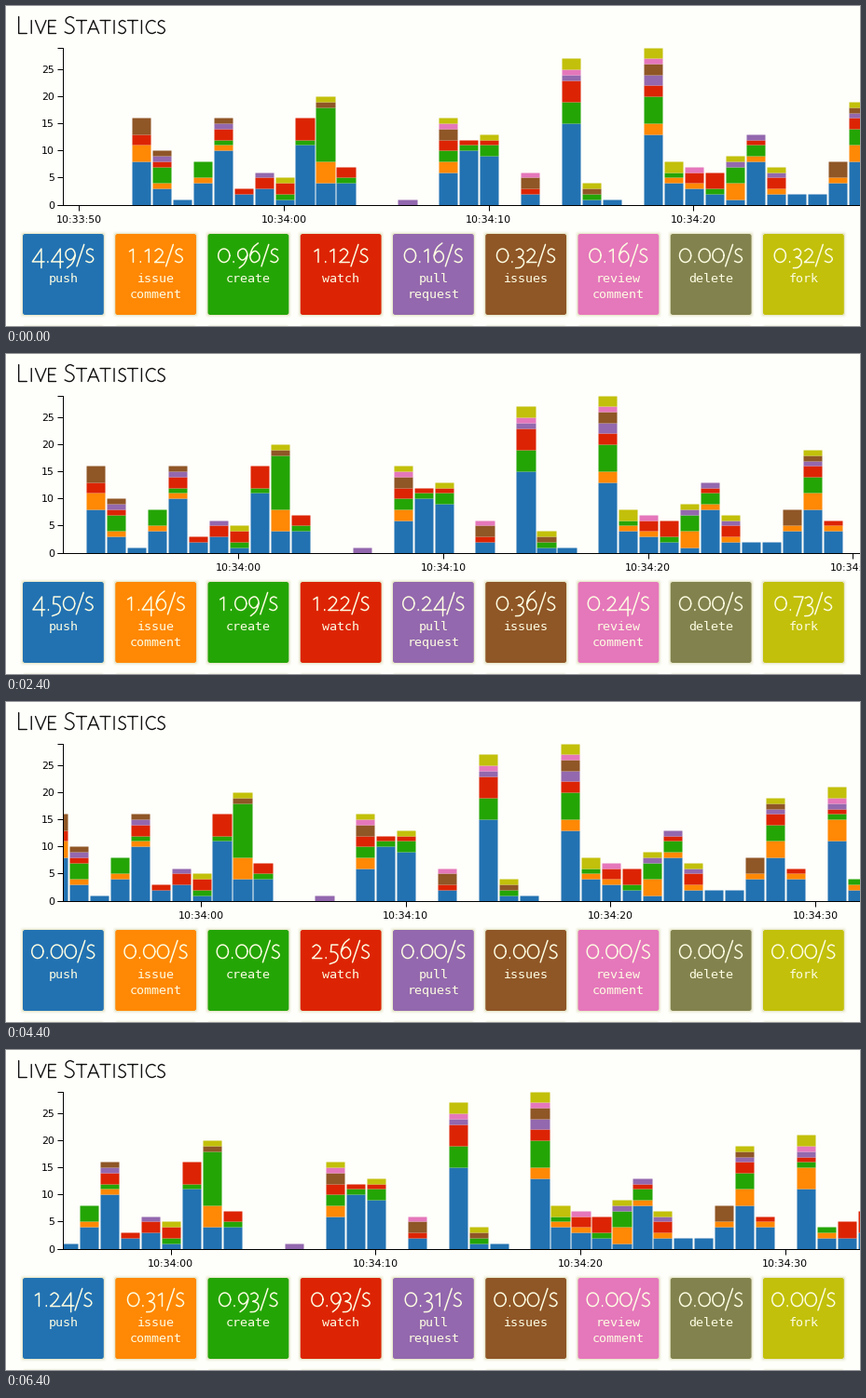
A matplotlib script that plays this animation: 916x344 px, repeating every 6.6 s.

```python
import numpy as np
import matplotlib.pyplot as plt
from matplotlib.animation import FuncAnimation
from matplotlib.collections import PatchCollection
from matplotlib.patches import FancyBboxPatch, PathPatch, Rectangle
from matplotlib.path import Path
from matplotlib.transforms import Affine2D

W, H, DPI = 916, 344, 100
STEP, FRAMES = 200, 33
PX = 72 / DPI
PAPER = "#fefefa"
CREAM = "#fdfde2"

NAMES = ["push", "issue\ncomment", "create", "watch", "pull\nrequest",
         "issues", "review\ncomment", "delete", "fork"]
COLORS = ["#2272b2", "#ff8804", "#24a506", "#dc2404", "#9368ae",
          "#8f5626", "#e577bb", "#82824e", "#c2c00a"]

# Events per second, keyed by seconds after 10:34:00
FIRST = -7
PUSH = [8, 3, 1, 4, 10, 2, 3, 1, 11, 4, 4, 0, 0, 0, 0, 6, 10, 9, 0, 2, 0,
        15, 1, 1, 0, 13, 4, 3, 2, 1, 8, 2, 2, 2, 4, 8, 4, 0, 11, 2, 2, 3]
COMMENT = {-7: 3, -6: 1, -4: 1, -3: 1, 2: 4, 8: 2, 18: 2, 19: 1, 20: 1, 22: 3,
           23: 1, 24: 1, 27: 1, 28: 3, 29: 1, 31: 4, 32: 1}
CREATE = {-6: 3, -4: 3, -3: 1, 0: 1, 1: 1, 2: 10, 3: 1, 8: 2, 9: 1, 10: 2,
          14: 4, 15: 1, 18: 5, 19: 1, 21: 1, 22: 3, 23: 2, 28: 3, 31: 1, 32: 1}
WATCH = {-7: 2, -6: 1, -3: 2, -2: 1, -1: 2, 0: 2, 1: 4, 3: 2, 8: 2, 9: 1,
         10: 1, 12: 1, 14: 4, 18: 2, 20: 2, 21: 3, 23: 1, 24: 2, 28: 2, 29: 1,
         31: 1, 33: 3, 34: 4}
PULL = {-6: 1, -3: 1, -1: 1, 6: 1, 14: 1, 18: 2, 22: 1, 23: 1, 24: 1, 28: 1, 31: 1}
ISSUES = {-7: 3, -6: 1, -3: 1, 2: 1, 8: 2, 12: 2, 15: 1, 18: 2, 27: 3, 28: 1}
REVIEW = {8: 1, 12: 1, 14: 1, 18: 1, 20: 1, 31: 1}
FORK = {0: 1, 2: 1, 8: 1, 10: 1, 14: 2, 15: 1, 18: 2, 19: 2, 22: 1, 24: 1,
        28: 1, 31: 2}
SERIES = [dict(enumerate(PUSH, FIRST)), COMMENT, CREATE, WATCH, PULL,
          ISSUES, REVIEW, {}, FORK]

# (start in ms, elapsed seconds, event counts)
RATES = [(0, 6.24, [28, 7, 6, 7, 1, 2, 1, 0, 2]),
         (400, 7.18, [34, 9, 9, 9, 2, 3, 2, 0, 3]),
         (1600, 8.22, [37, 12, 9, 10, 2, 3, 2, 0, 6]),
         (2600, 1, [0] * 9),
         (3000, 0.39, [0, 0, 0, 1, 0, 0, 0, 0, 0]),
         (6400, 3.23, [4, 1, 3, 3, 1, 0, 0, 0, 0])]

# Screen x of 10:34:00 over time
SCROLL_MS = [0, 1000, 1800, 2800, 4400, 5400, 6400]
SCROLL_X = [298, 280, 262.5, 240.5, 209, 196, 176.5]
SEC = 21.97
BASE, UNIT = 213.5, 5.82


def smooth(pts, n=8):
    """Catmull-Rom curve through the points."""
    p = np.array(pts, float)
    p = np.vstack([2 * p[0] - p[1], p, 2 * p[-1] - p[-2]])
    out = [p[1]]
    for a, b, c, d in zip(p, p[1:], p[2:], p[3:]):
        for t in np.arange(1, n + 1) / n:
            out.append(0.5 * (2 * b + (c - a) * t + (2 * a - 5 * b + 4 * c - d) * t**2
                              + (3 * b - a - 3 * c + d) * t**3))
    return np.array(out)


def line(*pts):
    return np.array(pts, float)


def curve(*pts):
    return smooth(pts)


def oval(cx, cy, rx, ry):
    a = np.linspace(0, 2 * np.pi, 41)
    return np.column_stack([cx + rx * np.cos(a), cy + ry * np.sin(a)])


SIX = curve((.7, 1.42), (.32, 1.08), (.1, .5), (.22, .1), (.47, 0), (.76, .2),
            (.78, .55), (.54, .82), (.3, .76), (.12, .5))
ESS = curve((.6, .92), (.38, 1), (.16, .86), (.18, .63), (.5, .45), (.63, .24),
            (.5, .04), (.3, 0), (.08, .09))

# Thin stroke lettering: advance and strokes, height 1
DIGITS = {
    "0": (1.02, [oval(.51, .5, .42, .5)]),
    "1": (.76, [line((.14, .8), (.42, .98), (.42, 0))]),
    "2": (.9, [curve((.12, .84), (.4, 1), (.68, .76), (.5, .4), (.1, 0)),
               line((.1, 0), (.8, 0))]),
    "3": (.8, [curve((.1, .9), (.38, 1), (.62, .78), (.52, .48), (.26, .36)),
               curve((.26, .36), (.6, .22), (.66, -.1), (.42, -.38), (.06, -.42))]),
    "4": (1, [line((.72, -.42), (.72, 1), (.06, .04), (.94, .04))]),
    "5": (.82, [line((.68, 1), (.2, 1), (.16, .48)),
                curve((.16, .48), (.46, .45), (.68, .18), (.55, -.22), (.08, -.42))]),
    "6": (.92, [SIX]),
    "7": (.8, [line((.06, 1), (.74, 1), (.26, -.42))]),
    "8": (.92, [oval(.46, .39, .36, .39), oval(.46, 1.1, .28, .32)]),
    "9": (.92, [[.92, 1] - SIX]),
    ".": (.4, [line((.2, 0), (.2, .06))]),
    "/": (.62, [line((.02, -.3), (.56, 1.32))]),
}
LETTERS = {
    "S": (.74, [ESS]),
    "L": (.68, [line((.12, 1), (.12, 0), (.6, 0))]),
    "I": (.5, [line((.25, 1), (.25, 0))]),
    "V": (.93, [line((.06, 1), (.46, 0), (.87, 1))]),
    "E": (.78, [line((.68, 1), (.14, 1), (.14, 0), (.7, 0)), line((.14, .52), (.6, .52))]),
    "T": (.86, [line((.04, 1), (.82, 1)), line((.43, 1), (.43, 0))]),
    "A": (.96, [line((.06, 0), (.48, 1), (.9, 0)), line((.2, .34), (.76, .34))]),
    "C": (.9, [curve((.8, .9), (.56, 1), (.26, .88), (.1, .5), (.26, .12),
                     (.56, 0), (.82, .1))]),
}
GLYPHS = {**DIGITS, **LETTERS}


def lettering(text, x, y, size, cap=None):
    """Path for text; letters after a word's first are set at the smaller size."""
    paths, start = [], True
    for ch in text:
        if ch == " ":
            x, start = x + size / 2, True
            continue
        s = cap if cap and start else size
        adv, strokes = GLYPHS[ch]
        paths += [Path(np.column_stack([x + s * p[:, 0], y - s * p[:, 1]])) for p in strokes]
        x, start = x + s * adv, False
    return Path.make_compound_path(*paths)


def rate_path(value, cx, size=14.5):
    text = f"{value:.2f}/S"
    width = size * sum(GLYPHS[c][0] for c in text)
    return lettering(text, cx - width / 2, 275.5, size)


def stroke(path, color, width):
    return ax.add_patch(PathPatch(path, fc="none", ec=color, lw=width * PX,
                                  capstyle="round", joinstyle="round"))


def label(x, y, text, **kw):
    opts = dict(family="DejaVu Sans", fontsize=11 * PX, color="black", ha="center",
                va="baseline", zorder=6)
    return ax.text(x, y, text, **{**opts, **kw})


def rule(xs, ys):
    return ax.plot(xs, ys, color="black", lw=PX, solid_capstyle="butt", zorder=5)[0]


def box(x, y, w, h, color, alpha=1.0):
    ax.add_patch(FancyBboxPatch((x, y), w, h, boxstyle="round,pad=0,rounding_size=2.5",
                                fc=color, ec="none", alpha=alpha))


fig = plt.figure(figsize=(W / DPI, H / DPI), dpi=DPI, facecolor=PAPER)
ax = fig.add_axes([0, 0, 1, 1])
ax.set_xlim(0, W)
ax.set_ylim(H, 0)
ax.set_autoscale_on(False)
ax.axis("off")

stroke(lettering("LIVE STATISTICS", 11.5, 29.5, 14, cap=18), "#111111", 1.4)

# Stacked bars, placed relative to 10:34:00
bars = []
for sec in range(FIRST, FIRST + len(PUSH)):
    total = 0
    for data, color in zip(SERIES, COLORS):
        n = data.get(sec, 0)
        if n:
            total += n
            bars.append(Rectangle((sec * SEC - 9.5, BASE - total * UNIT), 20.2, n * UNIT,
                                  fc=color, ec="none"))
shift = Affine2D()
chart = PatchCollection(bars, match_original=True, zorder=3)
chart.set_transform(shift + ax.transData)
ax.add_collection(chart, autolim=False)
chart.set_clip_path(Rectangle((62, 0), W - 62, 214, transform=ax.transData))

# Axes
rule([55, 60.5, 60.5, 55], [44.5, 44.5, BASE, BASE])
rule([60, W], [BASE, BASE])
for v in range(0, 30, 5):
    y = BASE - v * UNIT
    rule([55, 60.5], [y, y])
    label(52, y + 4, str(v), ha="right")
ticks = []
for sec, text in [(-10, "10:33:50"), (0, "10:34:00"), (10, "10:34:10"),
                  (20, "10:34:20"), (30, "10:34:30")]:
    ticks.append((sec, rule([0, 0], [BASE, 219.5]), label(0, 233, text)))

# Tiles
numbers = []
for i, (name, color) in enumerate(zip(NAMES, COLORS)):
    x = 18 + 99.25 * i
    cx = x + 43.4
    for grow, alpha in [(2.5, .12), (1.2, .3)]:
        box(x - grow, 245 - grow, 86.8 + 2 * grow, 87 + 2 * grow, "#c9c98c", alpha)
    box(x, 342.8, 86.8, 4, "#c9c98c", .2)
    box(x, 245, 86.8, 87, color)
    for k, part in enumerate(name.split("\n")):
        label(cx, 297 + 17 * k, part, family="DejaVu Sans Mono", fontsize=13.4 * PX,
              color=CREAM)
    numbers.append((cx, stroke(rate_path(0, cx), CREAM, 1.5)))


def draw(frame):
    ms = frame * STEP
    origin = np.interp(ms, SCROLL_MS, SCROLL_X)
    shift.clear().translate(origin, 0)
    for sec, mark, text in ticks:
        x = origin + sec * SEC
        # a tick fades as it slides past the left axis
        alpha = np.clip((x - 56.7) / 7.2, 0, 1) if x < 61 else 1
        mark.set_xdata([x, x])
        text.set_x(x)
        for part in (mark, text):
            part.set_alpha(alpha)
            part.set_visible(x < 930)
    _, elapsed, counts = [r for r in RATES if r[0] <= ms][-1]
    for (cx, patch), n in zip(numbers, counts):
        patch.set_path(rate_path(n / elapsed, cx))
    return []


anim = FuncAnimation(fig, draw, frames=FRAMES, interval=STEP, repeat=True,
                     repeat_delay=0, init_func=lambda: draw(0), blit=False)
plt.show()
```
